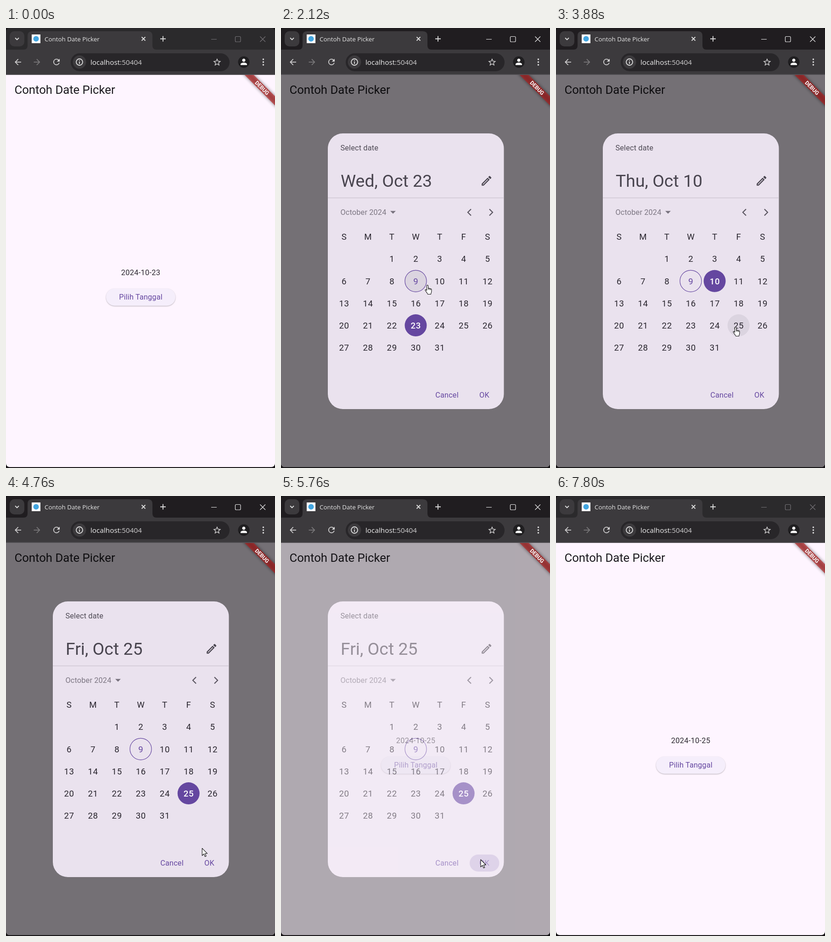
These frames come from a looping animation (586x956 px, 7.84 s). An HTML page:

```html
<!DOCTYPE html>
<html lang="en">
<head>
<meta charset="utf-8">
<title>Date Picker</title>
<style>
html, body { margin: 0; width: 100%; height: 100%; overflow: hidden; background: #111; }
svg { display: block; width: 586px; height: 956px; }
text { font-family: Roboto, sans-serif; white-space: pre; }
.ui { font-family: "Open Sans", sans-serif; }
.label { font-size: 16.37px; letter-spacing: .117px; }
.day { font-size: 18.7px; letter-spacing: .58px; fill: #29252e; text-anchor: middle; }
.mid { text-anchor: middle; }
.line { fill: none; stroke: #dedede; stroke-width: 1.8; }
</style>
</head>
<body>
<svg viewBox="0 0 586 956">
  <defs>
    <filter id="soft" x="-30%" y="-200%" width="160%" height="500%"><feGaussianBlur stdDeviation="3"/></filter>
    <clipPath id="page"><path d="M0 102H586V946a8 8 0 0 1-8 8H8a8 8 0 0 1-8-8Z"/></clipPath>
    <clipPath id="pickClip"><rect x="218" y="566" width="151" height="38" rx="19"/></clipPath>
    <clipPath id="okClip"><rect x="411" y="779" width="64.5" height="37" rx="18.5"/></clipPath>
  </defs>

  <!-- browser frame -->
  <rect width="586" height="956" fill="#151315"/>
  <path id="titleBar" d="M0 102V8a8 8 0 0 1 8-8H578a8 8 0 0 1 8 8V102Z"/>
  <g fill="#3c3a3d">
    <rect x="8" y="7" width="32" height="33" rx="10"/>
    <path d="M38 47q9 0 9-9V17q0-10 10-10H309q10 0 10 10V38q0 9 9 9Z"/>
    <rect y="47" width="586" height="54"/>
  </g>
  <rect y="100.5" width="586" height="1.5" fill="#59565b"/>
  <path class="line" d="M20 21.5l4 4 4-4M295.5 19.5l8 8m0-8l-8 8M336 23.5h12m-6-6v12"/>
  <rect x="56" y="14" width="19" height="19" fill="#fff"/>
  <circle cx="65.5" cy="23.5" r="6" fill="#42a5e0"/>
  <text class="ui" x="84" y="28.5" font-size="13.4" fill="#e6e6e6">Contoh Date Picker</text>
  <path id="controls" fill="none" stroke-width="1.2" d="M447 24.5h12M501.5 18.5h7.500q2 0 2 2v7.500q0 2-2 2h-7.500q-2 0-2-2v-7.500q0-2 2-2ZM553.500 18.500l11.500 11.500m0-11.500l-11.500 11.500"/>

  <rect x="141" y="55" width="346" height="39" rx="19.5" fill="#282629"/>
  <circle cx="160" cy="74" r="14.5" fill="#3c3a3d"/>
  <circle class="line" cx="160" cy="74" r="7" stroke-width="1.6"/>
  <path class="line" d="M160 73v5M160 69.700v1.800"/>
  <text class="ui" x="184" y="79.500" font-size="15.3" fill="#f0f0f0">localhost<tspan fill="#d0cfd0">:50404</tspan></text>
  <path id="back" fill="#cfcecf" transform="translate(15.500 63.500) scale(.875)" d="M20 11H7.830l5.590-5.590L12 4l-8 8 8 8 1.410-1.410L7.830 13H20Z"/>
  <use href="#back" transform="translate(93.500) scale(-1 1)" opacity="0.42"/>
  <path fill="#d4d3d4" transform="translate(99.500 63.300) scale(.875)" d="M17.650 6.350A8 8 0 0 0 12 4a8 8 0 1 0 7.730 10h-2.080A6 6 0 1 1 12 6c1.660 0 3.140.69 4.220 1.780L13 11h7V4Z"/>
  <path fill="#d8d7d8" transform="translate(449.500 64) scale(.86)" d="M22 9.240l-7.190-.62L12 2 9.190 8.630 2 9.240l5.460 4.730L5.820 21 12 17.270 18.180 21l-1.630-7.030ZM12 15.400l-3.760 2.270 1-4.280-3.320-2.880 4.380-.38L12 6.100l1.710 4.040 4.380.38-3.320 2.880 1 4.280Z"/>
  <circle cx="518" cy="74" r="12.500" fill="#1f1e20"/>
  <path fill="#fff" d="M518 66.500a3.500 3.500 0 1 1-.01 0ZM511 80.500v-1.500c0-5 14-5 14 0v1.500Z"/>
  <path d="M560.500 68v.01M560.500 74v.01M560.500 80v.01" stroke="#dcdcdc" stroke-width="3.600" stroke-linecap="round"/>

  <g clip-path="url(#page)">
    <rect y="102" width="586" height="854" fill="#fef5ff"/>
    <text x="18.500" y="143" font-size="25.700" fill="#1d1b20">Contoh Date Picker</text>
    <text id="date" class="mid" x="293.600" y="537" font-size="16.370" letter-spacing=".29" fill="#2c2930"></text>
    <rect x="218" y="566" width="151" height="37.500" rx="18.750" fill="#f5eefb" style="filter:drop-shadow(0 1px 1px rgba(0,0,0,.28))"/>
    <g clip-path="url(#pickClip)" fill="#6547a0">
      <rect id="pickTint" x="218" y="566" width="151" height="37.500"/>
      <circle id="pickRipple" fill-opacity=".12"/>
    </g>
    <text class="label mid" x="293.500" y="590" fill="#6547a0">Pilih Tanggal</text>

    <g id="modal">
      <rect y="102" width="586" height="854" fill-opacity=".54"/>
      <rect x="102" y="229" width="383.500" height="599" rx="32.700" fill="#eae2ee"/>
      <text class="label" x="129.500" y="265.500" fill="#4f4a55">Select date</text>
      <text id="headline" x="130" y="345" font-size="37.400" fill="#49454f"></text>
      <path fill="#49454f" transform="translate(433.700 318) scale(1.169)" d="M14.060 9.020l.92.92L5.920 19H5v-.92l9.060-9.060M17.660 3c-.25 0-.51.1-.7.29l-1.830 1.830 3.750 3.750 1.830-1.830c.39-.39.39-1.020 0-1.410l-2.340-2.340c-.2-.2-.45-.29-.71-.29Zm-3.600 3.190L3 17.250V21h3.750L17.810 9.940Z"/>
      <rect x="102" y="368.500" width="383.500" height="1.170" fill="#c9c2ce"/>
      <text class="label" x="129.500" y="406" fill="#7d7783">October 2024</text>
      <path d="M238 397.500h12l-6 6Z" fill="#77717d"/>
      <path d="M414 393.500l-7 7 7 7M454 393.500l7 7-7 7" fill="none" stroke="#5b5661" stroke-width="2.200"/>
      <circle id="dayHover" r="24" fill="#49454f" fill-opacity=".09"/>
      <circle id="today" r="23.500" fill="none" stroke="#6547a0" stroke-width="1.200"/>
      <circle id="picked" r="24" fill="#6547a0"/>
      <g id="days"></g>
      <g clip-path="url(#okClip)" fill="#6547a0">
        <rect id="okTint" x="411" y="779" width="64.500" height="37"/>
        <circle id="okRipple" fill-opacity=".1"/>
      </g>
      <g class="label mid" fill="#6547a0">
        <text x="361.500" y="803">Cancel</text>
        <text x="443" y="803">OK</text>
      </g>
    </g>

    <g transform="translate(586 102) rotate(45) scale(1.169)">
      <rect x="-46" y="28" width="92" height="12" fill-opacity=".5" filter="url(#soft)"/>
      <rect x="-46" y="28" width="92" height="12" fill="#b71c1c" fill-opacity=".627"/>
      <text class="mid" y="37.600" font-size="10.200" font-weight="700" fill="#fff">DEBUG</text>
    </g>
  </g>

  <g id="cursor" stroke-linejoin="round" fill="#fff" stroke="#111" stroke-width="1.100">
    <path id="arrow" d="M0 0V16L3.800 12.400 6.300 18.300 8.800 17.200 6.300 11.500H11.300Z"/>
    <g id="hand" transform="translate(-5.600 0)">
      <path d="M4 2.200a1.600 1.600 0 0 1 3.200 0V8.200c.3-1.200 2.600-1 2.700.3.4-1 2.400-.7 2.400.6.6-.7 2.200-.3 2.200 1.100V14c0 3-1.300 3.800-1.500 6.500H6.200C5.900 18 2.800 15.500.9 12.200.1 10.800 1.800 9.700 2.900 10.900L4 12.300Z"/>
      <path d="M7.200 8v3M9.900 8.500v2.800M12.300 9v2.500" stroke-width=".9"/>
    </g>
  </g>
</svg>
<script>
const LOOP = 7840, STEP = 40;
const PRESS = 1240, OPEN = 1440, PICK_10 = 2800, PICK_25 = 4160, OK_PRESS = 5520, CLOSE = 5640, BLUR = 7480;
const TRAVEL = [
  [360, 330, 975], [960, 262, 600], [1200, 258, 592], [1640, 258, 592],
  [2040, 319, 558], [2440, 319, 558], [2680, 343, 562], [3000, 343, 562],
  [3640, 391, 649], [4320, 391, 649], [4920, 435, 790], [6560, 435, 790], [7080, 410, 975]
];
const el = Object.fromEntries([...document.querySelectorAll('svg [id]')].map(n => [n.id, n]));
const set = (node, attrs) => { for (const k in attrs) node.setAttribute(k, attrs[k]); };
const clamp = v => Math.max(0, Math.min(1, v));
const progress = (t, start, length) => clamp((t - start) / length);
const show = (node, on) => set(node, { visibility: on ? 'visible' : 'hidden' });
const inside = (p, x, y, w, h) => p.x >= x && p.x <= x + w && p.y >= y && p.y <= y + h;

const cellAt = (col, row) => ({ cx: 293.5 + 52.1 * (col - 3), cy: 453.5 + 48.15 * row });
const FIRST = 2;
const dayCell = d => cellAt((d + FIRST - 1) % 7, 1 + Math.floor((d + FIRST - 1) / 7));

function addCell(label, { cx, cy }) {
  const node = document.createElementNS('http://www.w3.org/2000/svg', 'text');
  set(node, { class: 'day', x: cx + 0.3, y: cy + 6.7 });
  node.textContent = label;
  el.days.append(node);
  return node;
}
[...'SMTWTFS'].forEach((letter, i) => addCell(letter, cellAt(i, 0)));
const dayText = Array.from({ length: 31 }, (_, i) => addCell(i + 1, dayCell(i + 1)));
set(el.today, dayCell(9));

function pointer(t) {
  let i = TRAVEL.findIndex(k => k[0] > t);
  if (i < 1) i = i < 0 ? TRAVEL.length - 1 : 1;
  const [t0, x0, y0] = TRAVEL[i - 1], [t1, x1, y1] = TRAVEL[i];
  const u = progress(t, t0, t1 - t0), e = u * u * (3 - 2 * u);
  return { x: x0 + (x1 - x0) * e, y: y0 + (y1 - y0) * e };
}

function dayUnder(p) {
  const col = Math.round((p.x - 293.5) / 52.1) + 3;
  const row = Math.round((p.y - 453.5) / 48.15);
  const day = (row - 1) * 7 + col - FIRST + 1;
  return col >= 0 && col < 7 && day >= 1 && day <= 31 ? day : 0;
}

function draw(t) {
  const p = pointer(t);
  const active = t >= PRESS && t < BLUR;
  set(el.titleBar, { fill: active ? '#201d20' : '#2b2a2c' });
  set(el.controls, { stroke: active ? '#ececec' : '#747276' });

  const modalOn = t >= OPEN && t < CLOSE;
  const opacity = progress(t, OPEN, 150) * (1 - progress(t, CLOSE + 60, 140));
  set(el.modal, { opacity });
  show(el.modal, opacity > 0);
  el.date.textContent = t < CLOSE ? '2024-10-23' : '2024-10-25';

  const overPick = !modalOn && inside(p, 218, 566, 151, 38);
  const pressed = progress(t, PRESS, 80) * (1 - progress(t, OPEN, 160));
  set(el.pickTint, { opacity: overPick || pressed ? 0.07 + 0.06 * pressed : 0 });
  set(el.pickRipple, {
    cx: 261, cy: 592, opacity: pressed,
    r: 23 + 7 * progress(t, PRESS, 120) + 90 * progress(t, 1360, 225)
  });

  const chosen = t < PICK_10 ? 23 : t < PICK_25 ? 10 : 25;
  el.headline.textContent = { 23: 'Wed, Oct 23', 10: 'Thu, Oct 10', 25: 'Fri, Oct 25' }[chosen];
  set(el.picked, dayCell(chosen));
  dayText.forEach((node, i) => {
    const day = i + 1;
    node.style.fill = day === chosen ? '#fff' : day === 9 ? '#6547a0' : '';
    node.style.fontWeight = day === chosen ? 500 : 400;
  });

  const hovered = modalOn ? dayUnder(p) : 0;
  set(el.dayHover, hovered ? { ...dayCell(hovered), opacity: 1 } : { opacity: 0 });

  const overOk = inside(p, 411, 779, 64.5, 37);
  const okDown = progress(t, OK_PRESS, 80);
  set(el.okTint, { opacity: overOk ? 0.08 + 0.09 * okDown : 0 });
  set(el.okRipple, { cx: 436, cy: 795, r: 12 + 19 * progress(t, OK_PRESS, 160) + 16 * progress(t, 5680, 120), opacity: okDown });

  const clickable = overPick || (modalOn && (hovered || overOk));
  show(el.hand, clickable);
  show(el.arrow, !clickable);
  set(el.cursor, { transform: `translate(${p.x} ${p.y})` });
}

const begin = performance.now();
function tick() {
  const t = (performance.now() - begin) % LOOP;
  draw(Math.floor(t / STEP) * STEP);
  requestAnimationFrame(tick);
}
tick();
</script>
</body>
</html>
```
